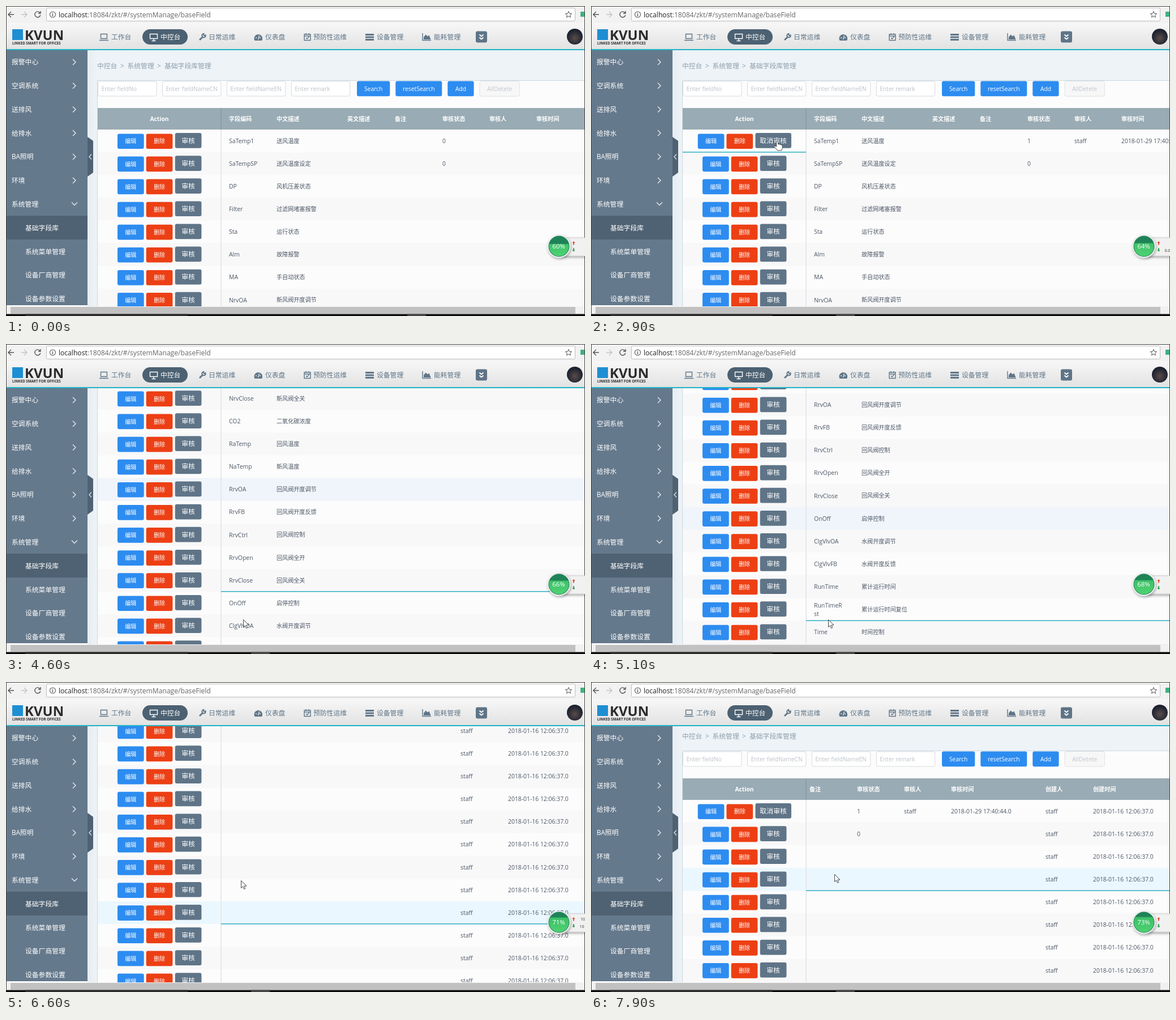
An HTML page for the animation above (8000 ms loop, 1023 px wide and 547 px high).

```html
<!DOCTYPE html>
<html lang="zh">
<head>
<meta charset="utf-8">
<title>基础字段库管理</title>
<style>
html, body { margin: 0; width: 100%; height: 100%; overflow: hidden; background: #fff; }
svg { display: block; }
text { font-family: "Open Sans", "Noto Sans CJK SC", "Noto Sans CJK", "Noto Sans", sans-serif; white-space: pre; }
#stage.done .old, #stage:not(.done) .new { display: none; }
.line { fill: none; stroke-width: 1.4; }
</style>
</head>
<body>
<svg id="stage" width="1023" height="547" viewBox="0 0 1023 547">
  <defs>
    <linearGradient id="bar" x2="0" y2="1"><stop stop-color="#f7f7f7"/><stop offset="1" stop-color="#e2e2e2"/></linearGradient>
    <linearGradient id="gutter"><stop stop-color="#e6edf2"/><stop offset="1" stop-color="#eef3f7"/></linearGradient>
    <linearGradient id="ball" x2="0" y2="1"><stop stop-color="#35b862"/><stop offset="1" stop-color="#4fd273"/></linearGradient>
    <radialGradient id="face" cy=".6"><stop stop-color="#5a4c4a"/><stop offset="1" stop-color="#1d2230"/></radialGradient>
    <filter id="soft" x="-30%" y="-30%" width="160%" height="160%"><feDropShadow dx="1" dy="2" stdDeviation="2" flood-opacity=".35"/></filter>
  </defs>
  <rect width="1023" height="547" fill="#fff"/>

  <!-- scrolling page -->
  <svg x="144" y="78" width="878" height="452" viewBox="144 78 878 452">
    <rect x="144" y="78" width="878" height="452" fill="#eef3f7"/>
    <rect x="144" y="78" width="18" height="452" fill="url(#gutter)"/>
    <g id="page"></g>
  </svg>

  <!-- browser bar -->
  <rect width="1023" height="31" fill="#f2f2f2"/>
  <rect x="71.500" y="3.500" width="934" height="23" rx="2" fill="#fff" stroke="#bdbdbd"/>
  <g class="line" stroke="#555">
    <path d="M14 15H4m5-5l-5 5 5 5"/>
    <path d="M27 15h10m-5-5l5 5-5 5" stroke="#c4c4c4"/>
    <path d="M60 12a5 5 0 1 0 .8 4M61 9v4h-4"/>
    <circle cx="82.500" cy="15" r="5" stroke-width="1.100"/><path d="M82.500 14v4m0-6v1.200"/>
    <path d="M994 9.500l1.600 3.700 4 .3-3 2.600.9 3.900-3.500-2.100-3.500 2.100.9-3.900-3-2.600 4-.3z" stroke-width="1"/>
  </g>
  <rect x="1015" y="10" width="8" height="9" fill="#3fb27f"/>

  <!-- application header -->
  <rect y="30" width="1023" height="47" fill="url(#bar)"/>
  <rect y="76" width="1023" height="2" fill="#1fb3c6"/>
  <rect x="11" y="41" width="19" height="19" fill="#1e8fd2"/>
  <rect x="241" y="41" width="80" height="27" rx="13.500" fill="#4c6172"/>
  <rect x="830" y="44.500" width="20" height="20" rx="3" fill="#5f7487"/>
  <g class="line" stroke="#5f7587">
    <path d="M167.500 49.500h11v8h-11zM165 60.500h16"/>
    <path d="M254.500 49.500h13v8h-13zM261 58v3m-3.500.5h7" stroke="#fff"/>
    <path d="M342 60l6-6" stroke-width="2.800"/><path d="M352.500 51a3.300 3.300 0 1 1-3-2l-.3 2.400 1.800 1.200z" stroke-width="1.800"/>
    <path d="M527 50h11v10.500h-11zM527 53h11M530 48v3m5-3v3m-5 5l2 2 3.500-4"/>
    <path d="M635 50.500h15m-15 4.500h15m-15 4.500h15" stroke-width="3.200"/>
    <path d="M736 48v12.500h15"/>
    <path d="M836.500 50.500l3.500 3 3.500-3m-7 5l3.500 3 3.500-3" stroke="#fff" stroke-width="1.800"/>
  </g>
  <g fill="#5f7587">
    <path d="M439.500 61a7.300 7.300 0 1 1 12.500 0z"/><path d="M738 59v-4l3.500-4.500 3.500 3 2.500-2 3 7.500z"/>
    <path d="M445.500 59l2-7M441 56h2m5 0h2" stroke="#eee" stroke-width="1.300"/>
  </g>
  <circle cx="1005" cy="54" r="14" fill="url(#face)"/>
  <g id="header"></g>

  <!-- side menu -->
  <rect x="1" y="78" width="143" height="450" fill="#65798c"/>
  <rect x="1" y="370" width="143" height="42" fill="#4f6273"/>
  <path d="M144 231l10 7v56l-10 7z" fill="#4f6273"/>
  <path class="line" d="M151 261.500l-4 4.500 4 4.500" stroke="#d5dde3"/>
  <g id="menu"></g>

  <!-- window edges -->
  <rect y="528" width="144" height="2" fill="#fff"/>
  <rect y="530" width="1023" height="13" fill="#f1f1f1"/>
  <rect x="8" y="531" width="998" height="12" fill="#c1c1c1"/>
  <rect y="543.500" width="1023" height="4" fill="#0c0c0c"/>
  <rect x="34" y="543.500" width="287" height="4" fill="#2c2c2c"/>
  <rect id="task" y="543.500" width="33" height="4" fill="#454545"/>
  <path d="M0 .5H1023M.5 0V543M1022.500 0V543" stroke="#444"/>

  <!-- floating meter -->
  <rect x="980" y="409" width="50" height="32" fill="#f1f1f1" stroke="#cfcfcf" filter="url(#soft)"/>
  <circle cx="977" cy="424" r="20.500" fill="#e9ecea" filter="url(#soft)"/>
  <circle cx="977" cy="424" r="18.500" fill="#1f8358"/>
  <svg id="level" x="957" width="40"><circle cx="977" cy="424" r="17.500" fill="url(#ball)"/></svg>
  <path d="M1003 415l2.500 3h-1.600v3.500h-1.800v-3.500h-1.600z" fill="#e8432c"/>
  <path d="M1003 433.500l2.500-3h-1.600v-3.500h-1.800v3.500h-1.600z" fill="#26a04c"/>
  <text id="percent" x="976.500" y="427.500" font-size="11.500" fill="#fff" text-anchor="middle"></text>
  <text id="up" x="1015" y="421" font-size="7" fill="#333"></text>
  <text id="down" x="1013.500" y="434" font-size="7" fill="#333"></text>

  <g id="cursor" stroke="#333" stroke-width=".9" fill="#fff" stroke-linejoin="round">
    <path id="arrow" d="M.5 .5v13l3-2.700 2 4.700 2.200-1-2-4.500h4.300z"/>
    <path id="hand" d="M-1.500 10V1.500q1.500-2.500 3 0V6q2-1 3 .5 2-.8 2.700.7 2-.2 2 1.500v4q-.7 2-1.700 4.300H.5q-2-3-6-6.500 0-2.500 4-.5z"/>
  </g>
</svg>
<script>
const $ = id => document.getElementById(id);
const ROW = 40.1, TOP = 218, SPLIT = 380, LOOP = 8000;
const BLUE = '#2d8cf0', RED = '#ed3f14', SLATE = '#5f7487', INK = '#4d5766';
const CREATED = '2018-01-16 12:06:37.0', AUDITED = '2018-01-29 17:40:44.0', USER = 'staff';

const rows = `SaTemp1 送风温度,SaTempSP 送风温度设定,DP 风机压差状态,Filter 过滤网堵塞报警,Sta 运行状态,Alm 故障报警,
MA 手自动状态,NrvOA 新风阀开度调节,NrvFB 新风阀开度反馈,NrvCtrl 新风阀控制,NrvOpen 新风阀全开,NrvClose 新风阀全关,
CO2 二氧化碳浓度,RaTemp 回风温度,NaTemp 新风温度,RrvOA 回风阀开度调节,RrvFB 回风阀开度反馈,RrvCtrl 回风阀控制,
RrvOpen 回风阀全开,RrvClose 回风阀全关,OnOff 启停控制,ClgVlvOA 水阀开度调节,ClgVlvFB 水阀开度反馈,
RunTime 累计运行时间,RunTimeRst 累计运行时间复位,Time 时间控制`.split(/,\s*/).map(r => r.split(' '));

// Text centred vertically on cy
const text = (x, cy, s, size, fill, more = '') =>
  `<text x="${x}" y="${cy + size * .37}" font-size="${size}" fill="${fill}" ${more}>${s}</text>`;
const rect = (x, y, w, h, fill, more = '') =>
  `<rect x="${x}" y="${y}" width="${w}" height="${h}" fill="${fill}" ${more}/>`;
const cell = (x, cy, s) => text(x, cy, s, /[a-z0-9]/i.test(s) ? 10.4 : 10.1, INK);
const button = (x, y, w, s, fill, size = 10.1, ink = '#fff', edge = 'none') =>
  rect(x, y, w, 26.7, fill, `rx="3" stroke="${edge}" stroke-width=".8"`) +
  text(x + w / 2, y + 13.3, s, size, ink, 'text-anchor="middle"');

const actions = (x, cy, audit, w) =>
  button(x, cy - 12.6, 46.7, '编辑', BLUE) +
  button(x + 50.7, cy - 12.6, 46.7, '删除', RED) +
  button(x + 101.7, cy - 13.9, w, audit, SLATE, 11.9);

function buildHeader() {
  const nav = [[186, '工作台'], [273, '中控台'], [358, '日常运维'], [458, '仪表盘'],
    [543, '预防性运维'], [655, '设备管理'], [756, '能耗管理']];
  $('header').innerHTML =
    `<text x="93" y="19.500" font-size="12.100" fill="#222">localhost<tspan fill="#666">:18084/zkt/#/systemManage/baseField</tspan></text>` +
    text(33, 51.5, 'KVUN', 24, '#2b2b2b', 'font-weight="700"') +
    text(11, 66, 'LINKED SMART FOR OFFICES', 6.2, '#2b2b2b', 'font-weight="700"') +
    nav.map(([x, s], i) => text(x, 55, s, 11.8, i == 1 ? '#fff' : '#5f7587')).join('');
}

function buildMenu() {
  const main = ['报警中心', '空调系统', '送排风', '给排水', 'BA照明', '环境', '系统管理'];
  const sub = ['基础字段库', '系统菜单管理', '设备厂商管理', '设备参数设置'];
  $('menu').innerHTML = main.map((s, i) => {
    const y = 99 + i * 41.75;
    const d = i < 6 ? `M118 ${y - 5}l5 5-5 5` : `M116 ${y - 3}l5 5 5-5`;
    return text(10, y, s, 11.8, '#fff') + `<path class="line" d="${d}" stroke="#e3e9ee"/>`;
  }).join('') + sub.map((s, i) => text(34, 391.5 + i * 41.75, s, 11.8, '#fff')).join('');
}

function buildPage() {
  const end = TOP + rows.length * ROW;
  const crumbs = [[161, '中控台'], [202, '&gt;'], [214.5, '系统管理'], [267, '&gt;'], [280, '基础字段库管理']];
  const fields = ['fieldNo', 'fieldNameCN', 'fieldNameEN', 'remark'];
  const heads = [[394, '字段编码'], [478, '中文描述'], [603, '英文描述'], [687, '备注'], [771, '审核状态'],
    [854, '审核人'], [937, '审核时间'], [1104, '创建人'], [1188, '创建时间']];
  const bold = 'font-weight="700"';
  let fixed = '', main = '', stripes = '';

  rows.forEach(([code, name], i) => {
    const y = TOP + i * ROW, cy = y + 20;
    if (i % 2) stripes += rect(162, y, 860, ROW, '#f8f8f9');
    fixed += i ? actions(197, cy, '审核', 46.7)
      : `<g class="old">${actions(197, cy, '审核', 46.7)}</g><g class="new">${actions(188.7, cy, '取消审核', 63.5)}</g>`;
    main += (code.length > 9 ? cell(394, cy - 7.5, code.slice(0, 8)) + cell(394, cy + 7.5, code.slice(8)) : cell(394, cy, code)) +
      cell(478, cy, name) + cell(1104, cy, USER) + cell(1188, cy, CREATED);
    if (i == 1) main += cell(771, cy, '0');
    if (i == 0) main += `<g class="old">${cell(771, cy, '0')}</g><g class="new">${
      cell(771, cy, '1') + cell(854, cy, USER) + cell(937, cy, AUDITED)}</g>`;
  });

  $('page').innerHTML =
    crumbs.map(([x, s]) => text(x, 106, s, 11.8, '#8c9fac')).join('') +
    rect(161.5, 131.5, 870, end + 14 - 131.5, '#fcfcfc', 'stroke="#ccd8df"') +
    fields.map((s, i) => rect(162.5 + i * 113.9, 133, 103.5, 26, '#fff', 'rx="3" stroke="#d7dade"') +
      text(168.5 + i * 113.9, 146, 'Enter ' + s, 10.2, '#bcc1c8')).join('') +
    button(620, 132.5, 58.3, 'Search', BLUE, 10.3) + button(688.3, 132.5, 82, 'resetSearch', BLUE, 10.3) +
    button(780.3, 132.5, 46.3, 'Add', BLUE, 10.3) +
    button(837, 132.5, 70.5, 'AllDetete', '#f7f7f7', 10.3, '#c0c4cc', '#d9dce0') +
    stripes + `<rect id="hover" x="162" width="860" height="${ROW}"/>` +
    rect(162, 180, 860, 38, '#99abb4') +
    text(271, 199, 'Action', 10.3, '#fff', bold + ' text-anchor="middle"') + fixed +
    `<svg x="${SPLIT}" y="0" width="642" height="1400" viewBox="${SPLIT} 0 642 1400"><g id="columns">` +
    heads.map(([x, s]) => text(x, 199, s, 10.1, '#fff', bold)).join('') + main + '</g></svg>' +
    rect(SPLIT - 1, 180, 2, 38, '#8b9ea8') + rect(SPLIT - 1, TOP, 2, end - TOP, '#e5e8ea') +
    '<rect id="underline" height="1.500" fill="#2fb0c4"/>' +
    rect(162, end + .5, 860, 13.5, '#f1f1f1') +
    `<path d="M171.500 ${end + 4.5}v5l-3-2.500z" fill="#888"/>` +
    `<rect id="thumb" y="${end + 1.5}" width="570" height="11" fill="#787878"/>`;
}

// Keys are [time, value]: blended by mix, held by hold
function mix(keys, t) {
  const i = keys.findIndex(k => k[0] > t);
  if (i < 0) return keys[keys.length - 1][1];
  if (!i) return keys[0][1];
  const [a, b] = [keys[i - 1], keys[i]];
  return a[1] + (b[1] - a[1]) * (t - a[0]) / (b[0] - a[0]);
}
const hold = (keys, t) => keys.reduce((v, k) => k[0] <= t ? k[1] : v, keys[0][1]);

const scrollY = [[3700, 0], [3900, 190], [4000, 199], [4500, 515], [4600, 583], [5200, 762],
  [6400, 762], [6600, 593], [7800, 20], [7900, 10]];
const scrollX = [[5800, 0], [6200, 301]];
const path = [[100, 520, 17], [900, 329, 238], [3200, 329, 238], [3600, 475, 525], [3800, 471, 492], [4000, 471, 492],
  [4600, 419, 486], [5300, 419, 486], [5800, 413, 505], [6200, 611, 508], [6500, 415, 350], [7100, 415, 350], [7900, 430, 339]];
const pathX = path.map(p => [p[0], p[1]]), pathY = path.map(p => [p[0], p[2]]);
const load = [[0, 60], [900, 62], [2000, 64], [3800, 66], [4800, 68], [5600, 69], [6500, 71], [7500, 73]];
const upRate = [[0, ''], [6500, '10'], [7500, '']];
const downRate = [[0, ''], [2900, '0.0'], [3800, ''], [5600, '0.0'], [6500, '10'], [7500, '']];

function set(id, attrs) {
  for (const k in attrs) $(id).setAttribute(k, attrs[k]);
}

function draw(t) {
  const sy = mix(scrollY, t), sx = mix(scrollX, t), x = mix(pathX, t), y = mix(pathY, t);
  const shown = t >= 100, hand = t >= 900 && t < 3300, fixed = x < SPLIT;
  $('stage').classList.toggle('done', t >= 1600);
  set('page', { transform: `translate(0 ${-sy})` });
  set('columns', { transform: `translate(${-sx} 0)` });
  set('thumb', { x: 177 + sx * .655, fill: t >= 5700 && t < 6300 ? '#787878' : '#c1c1c1' });

  // Hover trails the wheel slightly, its tint even more on the way down
  const row = Math.floor((y + mix(scrollY, t - 80) - TOP) / ROW);
  const on = shown && row >= 0 && row < rows.length;
  const falling = t >= 3800 && t < 5200;
  set('hover', { y: TOP + (row - (falling ? 4 : 0)) * ROW, fill: falling ? '#f0f5fb' : '#ebf7ff',
    visibility: on && !fixed ? 'visible' : 'hidden' });
  set('underline', { x: fixed ? 162 : SPLIT, width: fixed ? SPLIT - 162 : 642, y: TOP + (row + 1) * ROW - 1,
    visibility: on ? 'visible' : 'hidden' });

  set('cursor', { transform: `translate(${x} ${y})`, visibility: shown ? 'visible' : 'hidden' });
  $('hand').style.display = hand ? '' : 'none';
  $('arrow').style.display = hand ? 'none' : '';

  const pct = hold(load, t), top = 444 - pct * .4;
  set('level', { y: top, height: 444 - top, viewBox: `957 ${top} 40 ${444 - top}` });
  $('percent').textContent = pct + '%';
  $('up').textContent = hold(upRate, t);
  $('down').textContent = hold(downRate, t);
  set('task', { x: t < 1000 ? 709 : 433 });
}

buildHeader();
buildMenu();
buildPage();
const start = performance.now();
function tick() {
  const t = (performance.now() - start) % LOOP;
  draw(Math.floor(t / 100) * 100);
  requestAnimationFrame(tick);
}
tick();
</script>
</body>
</html>
```
